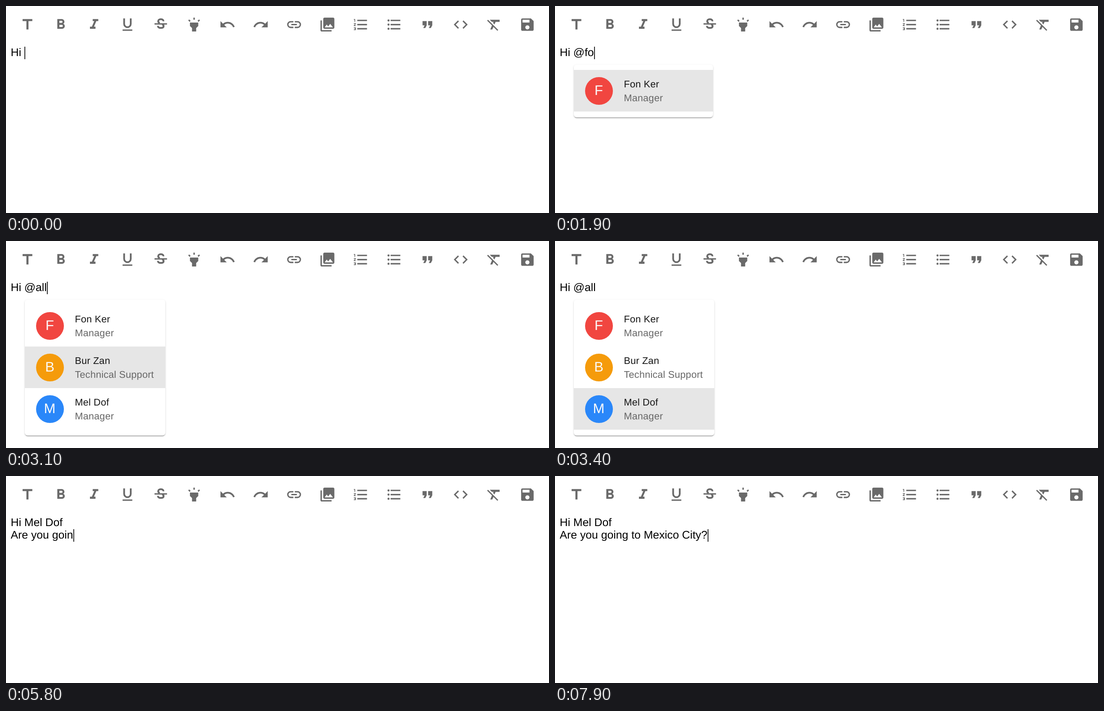
Write an HTML page that moves like this. It is 1210 px wide and 463 px high and loops after 8 s.

```html
<!DOCTYPE html>
<html lang="en">
<head>
<meta charset="utf-8">
<title>Rich text editor</title>
<style>
html, body { margin: 0; width: 100%; height: 100%; overflow: hidden; background: #fff; }
body { position: relative; font-family: "Liberation Sans", Arial, sans-serif; text-rendering: geometricPrecision; }
svg { position: absolute; left: 0; top: 0; }
.line { position: absolute; left: 10.5px; height: 28px; font-size: 24.77px; line-height: 28px; white-space: pre; color: #000; }
#line1 { top: 91px; }
#line2 { top: 119px; }
#caret { display: inline-block; width: 2px; height: 28px; margin-right: -2px; vertical-align: top; background: #2c2c2c; }
.popup {
  position: absolute; box-sizing: border-box; min-width: 310px; padding: 12.4px 0; border-radius: 6.2px; background: #fff;
  box-shadow: 0 3.1px 1.5px -1.5px rgba(0,0,0,.2), 0 1.5px 1.5px rgba(0,0,0,.14), 0 1.5px 4.6px rgba(0,0,0,.12);
}
#people { left: 41.5px; top: 131px; }
#cities { left: 197.5px; top: 159px; }
.row {
  display: flex; align-items: center; height: 93px; padding: 0 25px; white-space: pre;
  font-size: 21.67px; line-height: 31px; letter-spacing: .01071em; color: #161616;
}
.row.on { background: #e6e6e6; }
.row small { display: block; font-size: inherit; color: #666; }
.avatar { width: 62px; margin-right: 25px; border-radius: 50%; font-size: 31px; line-height: 60px; height: 62px; letter-spacing: 0; text-align: center; color: #fafafa; }
</style>
</head>
<body>
<svg width="1210" height="463" viewBox="0 0 1210 463" fill="#6a6a6a">
  <g class="icon"><path d="M5 4v3h5.5v12h3V7H19V4z"/></g>
  <g class="icon"><path d="M15.6 10.79c.97-.67 1.65-1.77 1.65-2.79 0-2.26-1.75-4-4-4H7v14h7.04c2.09 0 3.71-1.7 3.71-3.79 0-1.52-.86-2.82-2.15-3.42zM10 6.5h3a1.5 1.5 0 0 1 0 3h-3zm3.5 9H10v-3h3.5a1.5 1.5 0 0 1 0 3z"/></g>
  <g class="icon"><path d="M10 4v3h2.21l-3.42 8H6v3h8v-3h-2.21l3.42-8H18V4z"/></g>
  <g class="icon">
    <path d="M7.25 3v8a4.75 4.75 0 0 0 9.5 0V3" fill="none" stroke="#6a6a6a" stroke-width="2.5"/>
    <path d="M5 19h14v2H5z"/>
  </g>
  <g class="icon">
    <path d="M15.9 7.3C15.9 5.1 14.2 4.2 12.2 4.2 9.8 4.2 8.3 5.4 8.3 7.1 8.3 8.3 9 9.1 10.4 9.8M7.9 13.8C7.9 15.9 9.8 16.8 12.2 16.8 14.7 16.8 16.1 15.7 16.1 14 16.1 12.8 15.5 12.1 14 11.5" fill="none" stroke="#6a6a6a" stroke-width="2.6"/>
    <path d="M3 10h18v2H3z"/>
  </g>
  <g class="icon"><path d="M6 14l3 3v5h6v-5l3-3V9H6zM11 2h2v3h-2zM3.5 5.88l1.41-1.42 2.12 2.12L5.62 8zM16.96 6.58l2.12-2.12 1.42 1.42L18.38 8z"/></g>
  <g class="icon"><path id="undo" d="M12.5 8c-2.65 0-5.05.99-6.9 2.6L2 7v9h9l-3.62-3.62c1.39-1.16 3.16-1.88 5.12-1.88 3.54 0 6.55 2.31 7.6 5.5l2.37-.78C21.08 11.03 17.15 8 12.5 8z"/></g>
  <g class="icon"><use href="#undo" transform="matrix(-1 0 0 1 24 0)"/></g>
  <g class="icon"><path d="M11 7.95H7a4.05 4.05 0 0 0 0 8.1h4M13 7.95h4a4.05 4.05 0 0 1 0 8.1h-4M8 12h8" fill="none" stroke="#6a6a6a" stroke-width="1.95"/></g>
  <g class="icon"><path d="M22 16V4a2 2 0 0 0-2-2H8a2 2 0 0 0-2 2v12a2 2 0 0 0 2 2h12a2 2 0 0 0 2-2zm-11-4l2.03 2.71L16 11l4 5H8zM2 6v14a2 2 0 0 0 2 2h14v-2H4V6z"/></g>
  <g class="icon">
    <path d="M2 17h2v.5H3v1h1v.5H2v1h3v-4H2zM3 8h1V4H2v1h1zM2 11h1.8L2 13.1v.9h3v-1H3.2L5 10.9V10H2z"/>
    <path id="bars" d="M7 5h14v2H7zM7 11h14v2H7zM7 17h14v2H7z"/>
  </g>
  <g class="icon">
    <use href="#bars"/>
    <circle cx="4" cy="6" r="1.5"/><circle cx="4" cy="12" r="1.5"/><circle cx="4" cy="18" r="1.5"/>
  </g>
  <g class="icon"><path d="M6 17h3l2-4V7H5v6h3zM14 17h3l2-4V7h-6v6h3z"/></g>
  <g class="icon"><path d="M8.7 6.7L3.4 12l5.3 5.3M15.3 6.7l5.3 5.3-5.3 5.3" fill="none" stroke="#6a6a6a" stroke-width="1.98"/></g>
  <g class="icon"><path d="M3.27 5L2 6.27l6.97 6.97L6.5 19h3l1.57-3.66L16.73 21 18 19.73zM6 5v.18L8.82 8h2.4l-.72 1.68 2.1 2.1L14.21 8H20V5z"/></g>
  <g class="icon"><path d="M17 3H5a2 2 0 0 0-2 2v14a2 2 0 0 0 2 2h14a2 2 0 0 0 2-2V7zM12 19a3 3 0 0 1 0-6 3 3 0 0 1 0 6zM15 9H5V5h10z" fill-rule="evenodd"/></g>
</svg>
<div class="line" id="line1"><span></span><i id="caret"></i></div>
<div class="line" id="line2"><span></span></div>
<div class="popup" id="people"></div>
<div class="popup" id="cities"><div class="row on">Mexico City</div></div>
<script>
const LOOP = 8000, BLINK = 500;
const $ = id => document.getElementById(id);

const staff = [
  ["Fon Ker", "Manager", "#f14640"],
  ["Bur Zan", "Technical Support", "#f59b0b"],
  ["Mel Dof", "Manager", "#2a87f9"],
];

// [time, text]; a newline moves the caret to the second line
const hi = "Hi ", greet = hi + staff[2][0];
const edits = [
  [300, hi], [700, hi + "@"], [900, hi + "@f"], [1000, hi + "@fo"], [1200, hi + "@foo"],
  [1900, hi + "@fo"], [2000, hi + "@f"], [2100, hi + "@"],
  [2500, hi + "@a"], [2600, hi + "@al"], [2700, hi + "@all"],
  [3600, greet], [3900, greet + "\n"],
];
const typed = [
  [4300, "A"], [4500, "r"], [4600, "e"], [4800, " "], [5000, "y"], [5200, "ou"], [5300, " "],
  [5500, "g"], [5600, "o"], [5700, "i"], [5800, "n"], [6000, "g"], [6100, " "],
  [6300, "t"], [6400, "o "], [6500, "/"], [6700, "m"], [6800, "e"], [7000, "x"],
];
let text = greet + "\n";
for (const [t, s] of typed) edits.push([t, text += s]);
text = text.replace("/mex", "Mexico City");
edits.push([7300, text], [7800, text + "?"]);

// [time, rows shown, selected row]
const menus = [[0, 0, 0], [1000, 1, 0], [2100, 0, 0], [2600, 3, 0], [3100, 3, 1], [3300, 3, 2], [3600, 0, 0]];

document.querySelectorAll(".icon").forEach((icon, i) => {
  icon.setAttribute("transform", `translate(${47.8 + 74.27 * i} 41.6) scale(1.548) translate(-12 -12)`);
});

$("people").innerHTML = staff.map(([name, job, color]) =>
  `<div class="row"><div class="avatar" style="background:${color}">${name[0]}</div><div>${name}<small>${job}</small></div></div>`
).join("");

const rows = [...$("people").children];
const lines = [$("line1"), $("line2")];
const caret = $("caret");
const show = (el, on, display = "block") => { el.style.display = on ? display : "none"; };
const latest = (list, t) => list.findLast(e => e[0] <= t) || list[0];

function draw(t) {
  const [since, str] = latest(edits, t);
  const parts = str.split("\n");
  lines.forEach((line, i) => { line.firstChild.textContent = parts[i] || ""; });
  const home = lines[parts.length - 1];
  if (caret.parentNode !== home) home.append(caret);
  const age = Math.max(0, t - since);
  caret.style.visibility = Math.floor(age / BLINK) % 2 ? "hidden" : "visible";

  const [, count, selected] = latest(menus, t);
  show($("people"), count > 0);
  rows.forEach((row, i) => {
    show(row, i < count, "flex");
    row.classList.toggle("on", i === selected);
  });
  show($("cities"), t >= 6800 && t < 7300);
}

const start = performance.now();
function tick() {
  draw((performance.now() - start) % LOOP);
  requestAnimationFrame(tick);
}
tick();
</script>
</body>
</html>
```
